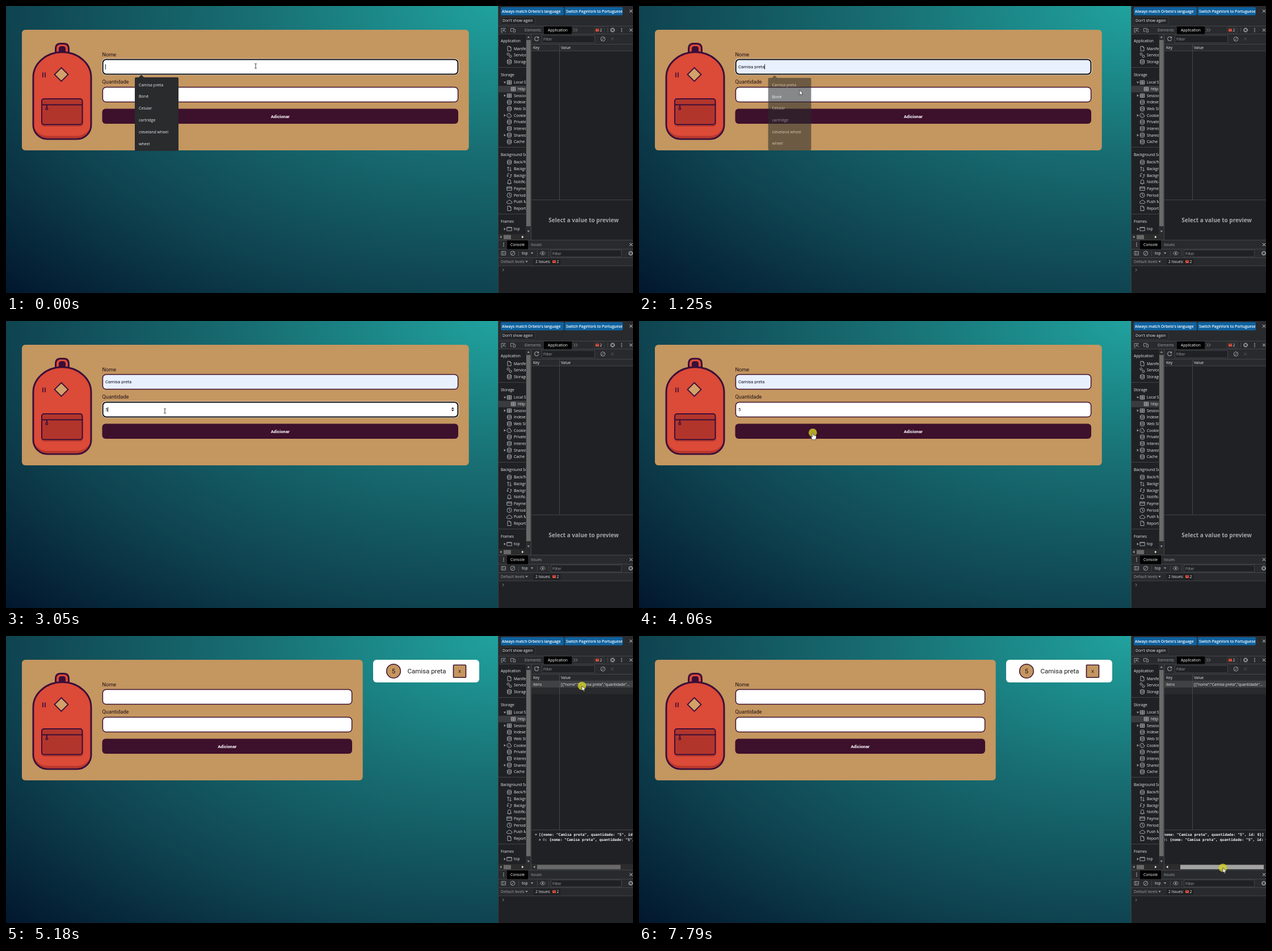
An HTML page that plays this animation: 1105x507 px, repeating every 8 s.

```html
<!DOCTYPE html>
<html lang="pt">
<head>
<meta charset="utf-8">
<style>
  html, body { margin: 0; overflow: hidden; }
  svg { display: block; width: 100vw; height: 100vh; font-family: 'Open Sans', sans-serif; }
  text { white-space: pre; }
  .page { font-family: Roboto, sans-serif; }
  .mono { font-family: 'DejaVu Sans Mono', monospace; }
  .mid { text-anchor: middle; }
  .medium { font-weight: 500; }
  .semi { font-weight: 600; }
  .bold { font-weight: 700; }
</style>
</head>
<body>
<svg id="stage" viewBox="0 0 1105 507" preserveAspectRatio="none"></svg>
<script>
const LOOP = 8000;
const PLUM = '#3d102c', TAN = '#c49660', INK = '#3a0f38', GREY = '#9aa0a6', LIGHT = '#e8eaed', EDGE = '#494c50', BAR = '#292a2d';
const stage = document.getElementById('stage');

const rect = (x, y, w, h, fill, r = 0, extra = '') =>
  `<rect x="${x}" y="${y}" width="${w}" height="${h}" rx="${r}" fill="${fill}" ${extra}/>`;
const circle = (x, y, r, fill, extra = '') => `<circle cx="${x}" cy="${y}" r="${r}" fill="${fill}" ${extra}/>`;
const path = (d, stroke, width = 1, fill = 'none') =>
  `<path d="${d}" stroke="${stroke}" stroke-width="${width}" fill="${fill}"/>`;
const shape = (d, fill) => path(d, 'none', 0, fill);
const text = (x, y, s, size, fill, cls = '') =>
  `<text x="${x}" y="${y}" font-size="${size}" fill="${fill}" class="${cls}">${s}</text>`;
const label = (x, midY, s, fill = LIGHT) => text(x, midY + 2.4, s, 6.7, fill, 'medium');
const at = (x, y, body) => `<g transform="translate(${x} ${y})">${body}</g>`;
const outline = (color, width = 1) => `stroke="${color}" stroke-width="${width}"`;

// Fraction done of a move made in n visible steps, the first at a and the last at b
const steps = (t, a, b, n) =>
  t < a ? 0 : Math.min(n, Math.floor((t - a) / (b - a) * (n - 1) + 1e-6) + 1) / n;
const during = (t, a, b) => t >= a && t < b;

// ---- Page ----
const backdrop = `<defs><radialGradient id="sky" cx="1" cy="0" r="1.414">
  <stop offset="0" stop-color="#20a29e"/><stop offset=".35" stop-color="#186f73"/>
  <stop offset=".7" stop-color="#0f4451"/><stop offset="1" stop-color="#02172e"/></radialGradient>
  <clipPath id="side"><path d="M867 50H916V403H867Z"/></clipPath>
  <clipPath id="value"><path d="M926 343H1105V403H926Z"/></clipPath></defs>` +
  rect(0, 0, 868, 507, 'url(#sky)');

const backpack =
  path('M87.5 84V76Q87.5 66.5 96 66.5H102Q110.5 66.5 110.5 76V84', INK, 3, '#dc4a38') +
  path('M93.5 82V75Q93.5 71.5 97 71.5H101Q104.5 71.5 104.5 75V82Z', INK, 1, INK) +
  path('M48 126A51 44.500 0 0 1 150 126V210A25 25 0 0 1 125 235H73A25 25 0 0 1 48 210Z', INK, 3, '#dc4a38') +
  shape('M49.500 210A23.500 20 0 0 0 73 229.500H125A23.500 20 0 0 0 148.500 210A23.500 23.500 0 0 1 125 233.500H73A23.500 23.500 0 0 1 49.500 210Z', '#b8372d') +
  path('M65 117.500V126M69 117.500V126', INK, 1.7) +
  path('M97.500 109L109.500 121L97.500 133L85.500 121Z', INK, 1.8, '#d4a069') +
  rect(62, 168, 74, 45, '#bd3a30', 5) +
  rect(63, 164, 71.500, 45.500, '#b2352c', 4, outline(INK, 2)) +
  path('M63 174.500H134.500', INK, 1.8) +
  path('M72 174.500V179', INK, 2) + circle(72, 181.500, 1.8, 'none', outline(INK, 1.4));

function field(y, right, fill, focused) {
  const w = right - 170.8;
  return focused
    ? rect(169.2, y - .3, w + 2.4, 28.4, 'none', 7, outline('#fff')) + rect(170.6, y + 1, w - .4, 26, fill, 6, outline('#101014', 2))
    : rect(170.4, y + 1, w, 26, fill, 6, outline(PLUM, 1.5));
}

function popup(y, width, items, hover, opacity, scale = 1) {
  const h = items.length * 21 + 4, cx = 227 + width / 2, cy = y + h / 2;
  const rows = items.map((s, i) => text(234, y + 15.5 + i * 20.9, s, 7.05, LIGHT, 'medium')).join('');
  return `<g opacity="${opacity}" transform="translate(${cx} ${cy}) scale(${scale}) translate(${-cx} ${-cy})">` +
    rect(227, y, width, h, '#292b2d', 2) + shape(`M234 ${y}L238.500 ${y - 4.5}L243 ${y}Z`, '#292b2d') +
    (hover ? rect(227, y + 3, width, 20, '#404245') : '') + rows + '</g>';
}

function page(t, mouse) {
  const added = t >= 4120, right = added ? 610 : 797;
  const onName = t < 1640, onAmount = during(t, 1640, 4060);
  const hoverAmount = pointerForm(t, mouse) === beam && mouse.y > 143;
  let s = rect(28, 42, right - 9.3, 213, TAN, 6) + backpack +
    text(169.5, 88.5, 'Nome', 9.2, '#241019', 'page') + text(169.5, 137, 'Quantidade', 9.2, '#241019', 'page') +
    field(93.5, right, during(t, 190, 4120) ? '#e8f0fe' : '#fff', onName) +
    field(142.500, right, '#fff', onAmount) +
    rect(169.5, 181.500, right - 169.5, 26.5, PLUM, 6) +
    text((right + 169.5) / 2, 197.5, 'Adicionar', 7.7, '#fff', 'page mid semi');
  if (during(t, 190, 4120)) s += text(175, 110.3, 'Camisa preta', 7.8, '#15151a', 'page');
  if (during(t, 2840, 4120)) s += text(175, 159.3, '5', 7.8, '#222', 'page');
  if (onAmount || hoverAmount)
    s += at(right - 9.7, 156, shape('M-2.600 -.8L0 -3.500L2.600 -.8ZM-2.600 .8L0 3.500L2.600 .8Z', '#2a1626'));

  const caret = (x, y) => rect(x, y, .9, 9, '#111');
  if (t < 120 || during(t, 640, 1180)) s += caret(175, 103);
  if (during(t, 1180, 1640)) s += caret(221, 103);
  if (during(t, 1780, 2310)) s += caret(175, 152);
  if (during(t, 2840, 3400) || during(t, 3920, 4060)) s += caret(179.2, 152);

  const fade = steps(t, 1180, 1310, 3) ** 2;
  if (fade < 1)
    s += popup(126, 77, ['Camisa preta', 'Boné', 'Celular', 'cartridge', 'cleveland wheel', 'wheel'],
      during(t, 260, 1180), 1 - fade, 1 - .035 * fade);
  const hint = steps(t, 1710, 1850, 3) - steps(t, 2840, 3050, 4);
  if (hint > 0) s += popup(175, 28, ['5'], false, hint);

  if (added)
    s += rect(647, 42, 187, 40, '#fff', 6) + circle(683, 62, 12.300, TAN, outline(PLUM, 1.5)) +
      text(683, 66, '5', 11.5, '#241019', 'page mid') + text(707.5, 66, 'Camisa preta', 11.5, '#1b1b1f', 'page') +
      rect(788.500, 51.200, 22, 22, TAN, 1, outline(PLUM, 1.6)) + text(799.5, 65, 'X', 8, '#241019', 'page mid');
  return s;
}

// ---- Inspector ----
const cross = (x, y, color = LIGHT) => at(x, y, path('M-2.500 -2.500L2.500 2.500M2.500 -2.500L-2.500 2.500', color, .9));
const noEntry = (x, y) => at(x, y, circle(0, 0, 3.8, 'none', outline(GREY)) + path('M-2.700 2.700L2.700 -2.700', GREY));
const gear = (x, y) => at(x, y, circle(0, 0, 3.300, 'none', `${outline(GREY, 1.6)} stroke-dasharray="1.900 .7"`) + circle(0, 0, 2.300, 'none', outline(GREY, .9)));
const dots = (x, y) => [-2.7, 0, 2.7].map(d => circle(x, y + d, .75, LIGHT)).join('');
const issueMark = (x, y) => rect(x, y - 3, 6, 5, '#e8503a', .6) + rect(x + 1.2, y - 1.7, 3.600, .9, BAR) + label(x + 7.500, y, '2');
const triangle = (x, y, dir, color = GREY) =>
  `<path transform="translate(${x} ${y}) rotate(${dir})" d="M-1.300 -2.200L1.800 0L-1.300 2.200Z" fill="${color}"/>`;

const icons = {
  doc: 'M-3 -4H1L3 -2V4H-3ZM1 -4V-2H3',
  gears: 'M-4 -2a2 2 0 1 0 4 0a2 2 0 1 0 -4 0M0 2a2 2 0 1 0 4 0a2 2 0 1 0 -4 0',
  base: 'M-3.500 -2.500a3.500 1.400 0 1 0 7 0a3.500 1.400 0 1 0 -7 0V2.500a3.500 1.400 0 0 0 7 0V-2.500M-3.500 0a3.500 1.400 0 0 0 7 0',
  grid: 'M-3.700 -3.200H3.700V3.200H-3.700ZM-3.700 -1H3.700M-3.700 1.100H3.700M0 -3.200V3.200',
  cookie: 'M1 -3.800A4 4 0 1 0 3.900 0Q1 0 1 -3.800M-1.500 -1V0M-1 1.500V2.400M1 1.500V2',
  arrows: 'M-2 4V-3.500M-3.800 -1.700L-2 -3.500L-.2 -1.700M2 -3V4M.2 2.200L2 4L3.800 2.200',
  sync: 'M-3 2V-2Q-3 -3.500 -1 -3.500H0M3 -2V2Q3 3.500 1 3.500H0M-4.300 .5L-3 2L-1.500 .5M1.500 -.5L3 -2L4.300 -.5',
  bell: 'M-3.500 2.500H3.500L2.500 1V-1.500a2.500 2.500 0 0 0 -5 0V1ZM-.8 4H.8',
  card: 'M-4.200 -3H4.200V3H-4.200ZM-4.200 -1H4.200',
  clock: 'M-4 0a4 4 0 1 0 8 0a4 4 0 1 0 -8 0M0 -2.500V0L2 1.200',
  cloud: 'M-2.500 3H2.500a2 2 0 0 0 .5 -4a3 3 0 0 0 -5.600 0a2 2 0 0 0 .1 4',
  frame: 'M-4.200 -3H4.200V3H-4.200ZM-4.200 -2.300H4.200',
};

// Each section: title, title height, first row height, rows of "icon name"
const sections = [
  ['Application', 61.500, 75.200, 'doc Manifest|gears Service workers|base Storage'],
  ['Storage', 121.500, 135, 'grid Local Storage|grid http://|grid Session Storage|base IndexedDB|base Web SQL|cookie Cookies|base Private State|base Interest Groups|base Shared Storage|base Cache Storage'],
  ['Background Services', 262.500, 276, 'base Back/forward|arrows Background|sync Background|bell Notifications|card Payment|clock Periodic|cloud Push Messaging|doc Reporting'],
  ['Frames', 380.500, 394, 'frame top'],
];
const expandable = { 'Local Storage': 90, 'Session Storage': 0, Cookies: 0, 'Shared Storage': 0, top: 0 };

const sidebar = '<g clip-path="url(#side)">' + rect(867, 141, 49, 11.5, '#3a3b3e') +
  sections.map(([title, y, top, rows]) =>
    label(872, y, title) + rows.split('|').map((row, i) => {
      const [icon, ...words] = row.split(' '), name = words.join(' ');
      const cy = top + i * 11.650, indent = name === 'http://' ? 7 : 0;
      return (name in expandable ? triangle(879, cy, expandable[name]) : '') +
        at(887 + indent, cy, path(icons[icon], '#b4b8bc', .9)) + label(895 + indent, cy, name);
    }).join('')).join('') +
  path('M867 108.500H916M867 249.500H916M867 367.500H916', EDGE, .8) + '</g>' +
  rect(916, 50, 10, 363, '#2c2c2d') + rect(917, 60, 7.5, 329, '#696969') +
  triangle(920.800, 55, -90) + triangle(920.800, 398, 90) +
  rect(867, 403, 59, 10, '#2c2c2d') + rect(877, 404.5, 13, 7.5, '#696969') +
  triangle(872, 408, 180) + triangle(910.500, 408, 0, '#fff');

const inspector = rect(867, 0, 238, 507, '#202124') +
  rect(867, 0, 238, 35, BAR) + rect(872, 2, 111, 14.500, '#0f629f', 2) + rect(984.500, 2, 102.500, 14.500, '#0f629f', 2) +
  text(874, 11.800, "Always match Orbelo's language", 6.65, '#fff', 'semi') +
  text(987, 11.800, 'Switch PageVork to Portuguese', 6.65, '#fff', 'semi') +
  rect(872.5, 20, 60, 12.500, '#222326', 2, outline('#3d3f42', .8)) + label(875, 26, 'Don\'t show again') + cross(1101.500, 9) +
  rect(867, 35, 238, 14.500, BAR) + path('M867 35.500H1105M867 49.500H1105', EDGE, .8) +
  path('M880 41V39.500H873V46.500H875M876 42L881 46M876 42V45.500M876 42H879.500', GREY, .9) +
  path('M896 39.500H889.500V45H892M894 41.500H897.500V46H894Z', GREY, .9) +
  label(914, 42.600, 'Elements', GREY) + rect(948, 36, 49, 13.500, '#000') + label(955, 42.600, 'Application', '#fff') +
  path('M1000 39.500L1003 42.500L1000 45.500M1004 39.500L1007 42.500L1004 45.500', GREY, .9) +
  rect(1036.500, 37, 18, 11, 'none', 2, outline('#3d3f42', .8)) + issueMark(1039, 43) +
  path('M1060.500 38V47', EDGE) + gear(1069, 42.500) + dots(1085, 42.500) + cross(1101.500, 42.500) +
  sidebar +
  rect(926, 50, 179, 17, BAR) + path('M938 55.500a3.600 3.600 0 1 0 .8 3M938.500 54V56.500H936', GREY, 1.1) +
  rect(944.500, 52, 93, 13, '#202124', 0, outline(EDGE, .8)) + label(947, 58.800, 'Filter', GREY) +
  noEntry(1052, 58.300) + cross(1068.500, 58.300, '#5a5d61') +
  rect(926, 67.500, 179, 11.500, BAR) + path('M926 67.500H1105M926 79.300H1105', EDGE, .8) +
  label(929, 73.200, 'Key') + label(978, 73.200, 'Value');

const drawer = path('M925.500 50V413M926 342.500H1105', EDGE, .8) +
  rect(867, 413, 238, 46, BAR) + path('M867 413.500H1105M867 429.500H1105M867 444.500H1105M867 459H1105', EDGE, .8) +
  dots(877, 421.500) + rect(883, 414, 37, 15.500, '#000') + label(889, 421.500, 'Console', '#fff') +
  label(925, 421.500, 'Issues', GREY) + cross(1101.500, 421.500) +
  path('M873 433.500H880.500V440H873ZM875.500 433.500V440M877.500 435L879.300 436.800L877.500 438.500', GREY, .9) + noEntry(893, 436.800) +
  path('M903.500 432V442M936.500 432V442M956.500 432V442', EDGE, .8) +
  label(909, 437, 'top') + triangle(927, 436.500, 90) +
  path('M941 436.800Q945.800 430.500 950.600 436.800Q945.800 443 941 436.800Z', GREY, .9) + circle(945.800, 436.800, 1.5, GREY) +
  rect(960.500, 431, 124, 12, '#202124', 0, outline(EDGE, .8)) + label(963, 437.200, 'Filter', GREY) + gear(1101, 436.800) +
  label(872, 452, 'Default levels', GREY) + triangle(917.500, 451.500, 90) +
  rect(929.500, 446.500, 48, 11, '#202124', 2) + label(933, 452, '2 Issues:') + issueMark(963, 452) +
  path('M875 464L877.300 466.200L875 468.500', GREY, .9) +
  path('M867.500 0V507', '#3c3f43', 1);

function storage(t, mouse) {
  const selected = t >= 5180;
  let s = '';
  if (t >= 4120)
    s += rect(926, 79.700, 179, 11.500, selected ? '#404143' : '#202124') + rect(926, 91.200, 179, 11.500, '#292a2c') +
      label(929, 85.500, 'itens') + text(978, 87.900, '[{"nome":"Camisa preta","quantidade"...', 6.56, LIGHT, 'medium');
  s += path('M975.500 67.500V342', EDGE, .9);
  if (!selected) return s + text(1018, 382.3, 'Select a value to preview', 10, '#a2a7ac', 'mid bold');

  const drag = t >= 7510 ? mouse.x - 1011 : 0;
  const thumb = t >= 7510 ? '#a3a3a3' : t >= 7240 ? '#7b7b7b' : '#696969';
  const value = '{nome: "Camisa preta", quantidade: "5", id: 0}';
  const row = (x, y, line) => text(x, y, line, 6.38, '#f1f3f4', 'mono semi');
  const key = during(t, 6200, 7510) ? '#5fc9bd' : '#b4b8bc';
  return s + '<g clip-path="url(#value)">' + at(-drag * 22 / 18, 0,
    triangle(934, 351, 90) + row(939, 353.4, `[${value}]`) +
    triangle(941, 360, 0) + text(946, 362.4, '0', 6.38, key, 'mono') + row(949.8, 362.4, ': ' + value)) + '</g>' +
    rect(926, 403, 179, 10, '#2c2c2d') + triangle(931, 408, 180, drag ? '#fff' : GREY) + rect(936 + drag, 404.300, 147, 7.7, thumb);
}

// ---- Pointer ----
// Moves: start, end, visible steps, then the place reached
const moves = [
  [120, 260, 3, 283, 148.5], [1390, 1560, 3, 280, 159], [3380, 3720, 5, 306.5, 200], [4060, 4120, 2, 306, 194.5],
  [4450, 5110, 10, 1015, 88], [5450, 5520, 2, 1014, 85.5], [6010, 6490, 8, 940.5, 384.5],
  [6830, 7310, 8, 1011, 409.5], [7510, 7790, 5, 1029, 409.5],
];
const presses = [[1100, 1240], [1630, 1710], [4060, 4120], [5110, 5250], [5720, 5850], [7450, LOOP]];

function pointer(t) {
  let x = 440, y = 106;
  for (const [a, b, n, toX, toY] of moves) {
    const p = steps(t, a, b, n), eased = p * p * (3 - 2 * p);
    x += (toX - x) * eased;
    y += (toY - y) * eased;
  }
  return { x, y };
}

const arrow = path('M0 0V8.800L2 7L3.400 10L4.800 9.400L3.500 6.500H6.200Z', '#111', .6, '#fff');
const beam = path('M-1.900 -4H-.6L0 -3.500L.6 -4H1.900M0 -3.500V3.500M-1.900 4H-.6L0 3.500L.6 4H1.900', '#222', .9);
const hand = path('M-1 1Q0 -.5 1 1V4.500L5 5.300Q6.300 5.700 6.200 7L5.300 12.500H-.3L-3 8.500Q-3.300 7 -2 7L-1 8Z', '#111', .6, '#fff');

function pointerForm(t, { x, y }) {
  const right = t >= 4120 ? 610 : 797, inside = x > 170 && x < right;
  const overPopup = t < 1310 && y > 126 && x > 227 && x < 304;
  if (overPopup || !inside) return arrow;
  if (y > 182 && y < 208) return hand;
  return (y > 94 && y < 121) || (y > 143 && y < 170) ? beam : arrow;
}

function cursor(t, mouse) {
  const pressed = presses.some(([a, b]) => during(t, a, b));
  return at(mouse.x, mouse.y, (pressed ? circle(0, 0, 7.3, '#d2cf24', 'opacity=".8"') : '') + pointerForm(t, mouse));
}

let shown = '';
function draw(now) {
  const t = now % LOOP, mouse = pointer(t);
  const scene = backdrop + page(t, mouse) + inspector + storage(t, mouse) + drawer + cursor(t, mouse);
  if (scene !== shown) stage.innerHTML = shown = scene;
  requestAnimationFrame(draw);
}
draw(performance.now());
</script>
</body>
</html>
```
